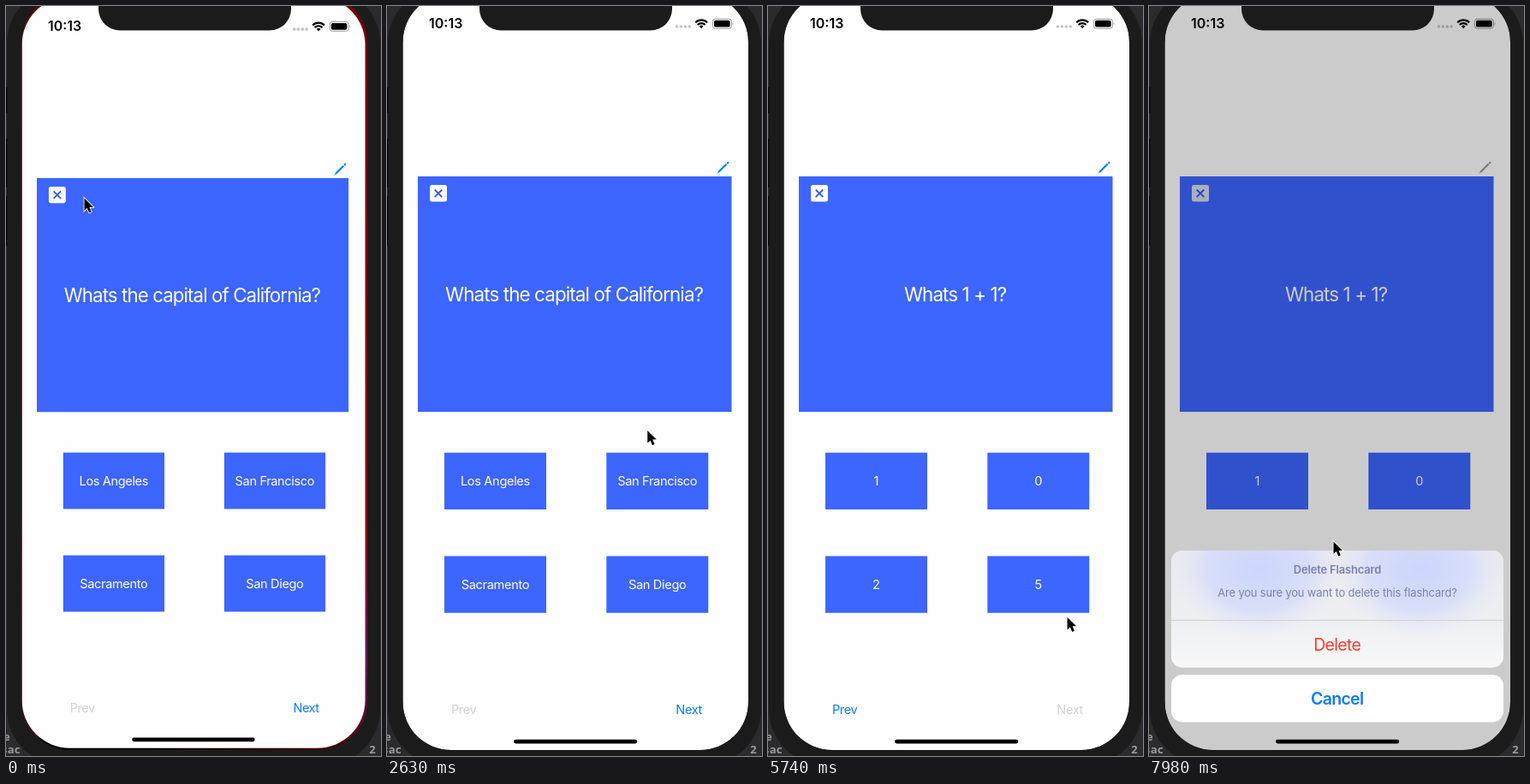
Write an HTML page that moves like this. It is 438x876 px and loops after 8 s.

```html
<!DOCTYPE html>
<html lang="en">
<head>
<meta charset="utf-8">
<title>Flashcards</title>
<style>
html, body { margin: 0; width: 100%; height: 100%; overflow: hidden; background: #2b2b2d; }
svg { display: block; width: 100vw; height: 100vh; }
text { font-family: Inter, "Open Sans", sans-serif; font-optical-sizing: none; text-anchor: middle; }
.card { fill: #3d65ff; }
.question { font-size: 22.4px; letter-spacing: -.04em; fill: #fff; }
.answer { font-size: 14.6px; letter-spacing: -.023em; fill: #fff; }
.nav { font-size: 14.6px; letter-spacing: -.03em; }
.small { font-size: 12.9px; letter-spacing: -.01em; }
.action { font-size: 19.5px; letter-spacing: -.035em; }
.bold { font-weight: 600; }
.editor { font: bold 13px "Noto Sans Mono", monospace; fill: #9b9b9d; text-anchor: start; }
</style>
</head>
<body>
<svg viewBox="0 0 438 876">
  <defs>
    <clipPath id="screenClip"><rect x="18.5" y="-14" width="403.5" height="883" rx="56"/></clipPath>
    <clipPath id="sheetClip"><rect x="26" y="636" width="388" height="136.5" rx="13"/></clipPath>
    <linearGradient id="edge" x2="0" y2="1">
      <stop offset="0" stop-color="#6d0608"/>
      <stop offset=".7" stop-color="#8c0710"/>
      <stop offset=".88" stop-color="#6a1760"/>
      <stop offset="1" stop-color="#4a0508"/>
    </linearGradient>
    <linearGradient id="shade">
      <stop offset=".3" stop-color="#000"/>
      <stop offset="1" stop-color="#000" stop-opacity="0"/>
    </linearGradient>
    <radialGradient id="glow">
      <stop offset="0" stop-color="#ccd5fc"/>
      <stop offset=".6" stop-color="#d6ddfa" stop-opacity=".9"/>
      <stop offset="1" stop-color="#e6e9f5" stop-opacity="0"/>
    </radialGradient>
    <linearGradient id="glass" x2="0" y2="1">
      <stop offset="0" stop-color="#e9eaee"/>
      <stop offset=".6" stop-color="#eeeff2"/>
      <stop offset="1" stop-color="#f8f8f9"/>
    </linearGradient>
  </defs>

  <!-- desktop and phone body -->
  <rect width="438" height="876" fill="#2b2b2d"/>
  <text class="editor" x="-3" y="858">e</text>
  <text class="editor" x="-6" y="873">sac</text>
  <text class="editor" x="424" y="873">2</text>
  <rect x="1" y="-22" width="436" height="909" rx="66" fill="#1b1b1b"/>
  <path d="M.5 95v30M.5 155v57M.5 222v58" stroke="#090909" stroke-width="2"/>

  <g clip-path="url(#screenClip)">
    <g id="gap">
      <rect x="18" y="-4" width="404" height="873" fill="url(#edge)"/>
      <rect x="18" y="855" width="404" height="14" fill="url(#shade)"/>
    </g>
    <g id="view">
      <rect x="18.5" y="-14" width="403.5" height="883" rx="56" fill="#fefefe"/>
      <text class="bold" x="68.7" y="26.2" font-size="16">10:13</text>
      <g id="signal" fill="#c4c4c6"></g>
      <path d="M360.3 19.3a9.8 9.8 0 0 1 13.8 0M362.7 22a6.3 6.3 0 0 1 9 0" fill="none" stroke="#000" stroke-width="2.2"/>
      <path d="M364.8 23.8a3.4 3.4 0 0 1 4.8 0L367.2 26.3Z"/>
      <rect x="380.4" y="15.2" width="22" height="11" rx="3" fill="none" stroke="#999"/>
      <rect x="382" y="16.8" width="18.6" height="7.8" rx="1.7"/>
      <path d="M403.7 18.8q1.8 1.9 0 3.8Z" fill="#999"/>

      <g id="pencil">
        <path d="M387.2 194L396.6 184.6M397.3 183.9L399 182.2" stroke-width="2.1"/>
        <path d="M386 195.3L387.6 193.7"/>
      </g>
      <rect class="card" x="36" y="199" width="366.5" height="275"/>
      <rect id="close" x="50" y="209" width="20" height="19.5" rx="2.5"/>
      <path id="cross" d="M55.7 214.5l8.6 8.6m0-8.6l-8.6 8.6" stroke="#3159e8" stroke-width="1.8"/>
      <text class="question" id="question" x="218.6" y="345"></text>
      <g id="answers"></g>
      <text class="nav" id="prev" x="89.6" y="827">Prev</text>
      <text class="nav" id="next" x="352.6" y="827">Next</text>
    </g>

    <rect id="dim" x="18" y="-14" width="405" height="884"/>
    <g id="sheet">
      <rect x="26" y="636" width="388" height="136.5" rx="13" fill="#f4f4f2"/>
      <g id="blur" clip-path="url(#sheetClip)">
        <rect x="26" y="636" width="388" height="137" fill="url(#glass)"/>
        <ellipse cx="127" cy="658" rx="100" ry="80" fill="url(#glow)"/>
        <ellipse cx="316" cy="658" rx="100" ry="80" fill="url(#glow)"/>
      </g>
      <g id="prompt">
        <text class="small bold" x="220" y="662.7">Delete Flashcard</text>
        <text class="small" x="220" y="690">Are you sure you want to delete this flashcard?</text>
      </g>
      <path d="M26 717.5h388" stroke="#cfcfd2"/>
      <text class="action" x="219.7" y="752.5" fill="#fb3b30">Delete</text>
      <rect x="26" y="781" width="388" height="55.5" rx="13" fill="#fefefe"/>
      <text class="action bold" x="219.7" y="815.5" fill="#0a7aff">Cancel</text>
    </g>
    <rect id="home" x="148" y="856.7" width="144.3" height="4.8" rx="2.4"/>
  </g>
  <path d="M108 -4V3.5A25 25 0 0 0 133 28.5H308A25 25 0 0 0 333 3.5V-4Z" fill="#1b1b1b"/>

  <path id="cursor" d="M0 0V14.6L3.3 11.5L5.6 17L8.3 15.9L6 10.4H10.5Z" stroke="#fff" stroke-width="1.6" paint-order="stroke"/>
</svg>
<script>
const LOOP = 8000, STEP = 148.2, LEAD = 107;
const BLUE = '#0a7cff', GREY = '#d3d3d5';
// Step numbers at which things happen
const TAPS = [25, 33], ALERT = 49;

const decks = [
  ['Whats the capital of California?', 'Los Angeles', 'San Francisco', 'Sacramento', 'San Diego'],
  ['Whats the capital of Florida?', 'Miami', 'Orlando', 'Tallahassee', 'Tampa'],
  ['Whats 1 + 1?', '1', '0', '2', '5']
];

// Pointer stops: step, x, y
const stops = [
  [3, 91.5, 224.5], [9, 291.5, 574.5], [11, 276, 580], [13, 239, 563], [14, 276, 574],
  [16, 276, 574], [19, 385, 273], [20, 425, 360], [22, 371.5, 722.5], [24, 343, 813],
  [37, 342.5, 812], [41, 388, 184], [44, 132, 203], [47, 59.2, 217],
  [50, 59.2, 217], [52, 122, 272], [53, 215.5, 625.5]
];

const $ = id => document.getElementById(id);
const put = (el, attrs) => {
  for (const name in attrs) el.setAttribute(name, attrs[name]);
  return el;
};
const add = (parent, tag, attrs) =>
  put($(parent).appendChild(document.createElementNS('http://www.w3.org/2000/svg', tag)), attrs);
const set = (id, attrs) => put($(id), attrs);

const ramp = (n, from, to) => Math.min(1, Math.max(0, (n - from) / (to - from)));
const smooth = k => k * k * (3 - 2 * k);
const mix = (a, b, k) => `color-mix(in srgb, ${a}, ${b} ${k * 100}%)`;

function pointerAt(n) {
  const i = stops.findIndex(stop => stop[0] >= n);
  const [end, x2, y2] = stops.at(i), [begin, x1, y1] = stops[Math.max(0, i - 1)];
  if (end === begin || i < 0) return [x2, y2];
  const k = smooth(ramp(n, begin, end));
  return [x1 + (x2 - x1) * k, y1 + (y2 - y1) * k];
}

for (let i = 0; i < 4; i++) add('signal', 'circle', { cx: 338.5 + i * 4.9, cy: 24, r: 1.8 });

const labels = [0, 1, 2, 3].map(i => {
  const x = 67 + i % 2 * 189.3, y = 521.7 + (i >> 1) * 120.8;
  add('answers', 'rect', { class: 'card', x, y, width: 119, height: 66.3 });
  return add('answers', 'text', { class: 'answer', x: x + 59.4, y: y + 38.6 });
});

function draw(t) {
  const n = Math.max(0, Math.floor((t - LEAD) / STEP));

  const grown = ramp(n, 0, 2);
  const resize = `translate(36 505) scale(${.9935 + .0065 * grown}) translate(-36 -505)`;
  set('view', { transform: resize });
  set('home', { transform: resize });
  set('gap', { opacity: grown < 1 ? 1 : 0 });
  set('cursor', { transform: `translate(${pointerAt(n)})` });

  // A tap dims Next at once; the new card fades in one step later.
  const card = TAPS.filter(tap => n > tap).length;
  const tap = TAPS.findLast(step => n >= step) ?? -9;
  const fade = .35 + .65 * ramp(n, tap + 1, tap + 3);
  $('question').textContent = decks[card][0];
  labels.forEach((label, i) => {
    label.textContent = decks[card][i + 1];
    put(label, { opacity: n > tap ? fade : 1 });
  });
  set('prev', { fill: card ? BLUE : GREY });
  set('next', { fill: card < 2 ? BLUE : GREY, opacity: .3 + .7 * ramp(n, tap, tap + 3) });

  const shown = 1 - (1 - ramp(n, ALERT, ALERT + 4)) ** 4;
  const blurred = ramp(n, ALERT + 1, ALERT + 3);
  set('cross', { opacity: Math.abs(n - ALERT) < 2 ? .6 : 1 });
  set('close', { fill: mix('#fff', '#d4d9ee', shown) });
  set('pencil', { stroke: mix(BLUE, '#959595', shown) });
  set('dim', { opacity: .2 * shown });
  set('sheet', { transform: `translate(0 ${240 * (1 - shown)})` });
  set('blur', { opacity: blurred });
  set('prompt', { fill: mix('#8c8c8c', '#7b80b0', blurred) });
}

const start = performance.now();
function tick() {
  draw((performance.now() - start) % LOOP);
  requestAnimationFrame(tick);
}
tick();
</script>
</body>
</html>
```
